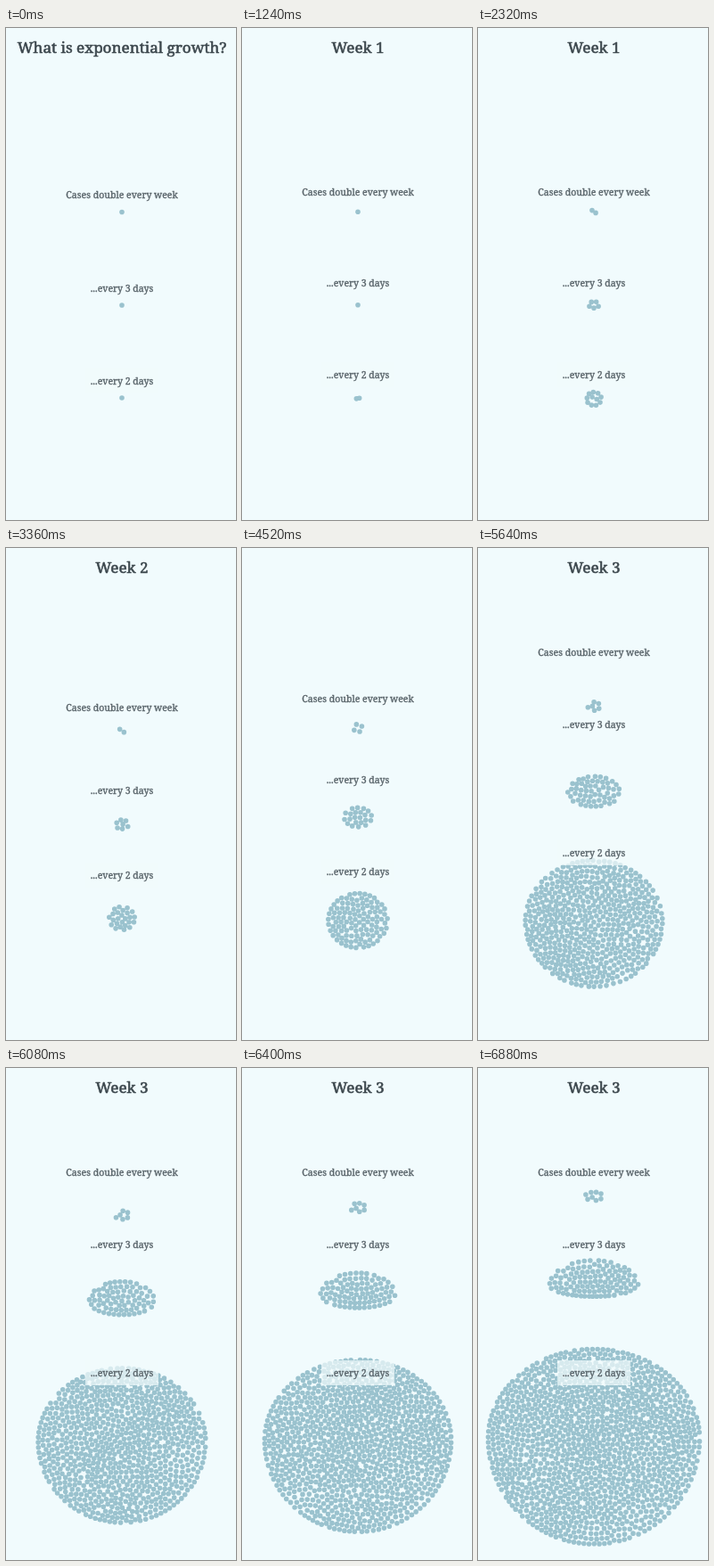
These frames come from a looping animation (258x552 px, 6.92 s). An HTML page with a canvas:

```html
<!DOCTYPE html>
<html lang="en">
<head>
<meta charset="utf-8">
<title>What is exponential growth?</title>
<style>
html, body { margin: 0; width: 100%; height: 100%; overflow: hidden; background: #f1fbfd; }
canvas { display: block; width: 258px; height: 552px; }
</style>
</head>
<body>
<canvas id="stage"></canvas>
<script>
const W = 258, H = 552, LOOP = 6920, STEP = 20;
const MID = 130, DOT = 2.8, GAP = 5.8, AREA = 33;
const BG = '#f1fbfd', DOT_COLOR = '#9ac2ce', TITLE_COLOR = '#3c474d', LABEL_COLOR = '#576268';
const FONT = '"Noto Serif", serif';

const titles = ['What is exponential growth?', 'Week 1', 'Week 2', 'Week 3'];
const weeks = [
  { out: 60, outEnd: 320, in: 430, move: 480, grow: 1150, end: 2350 },
  { out: 2610, outEnd: 2750, in: 2820, move: 2650, grow: 3200, end: 4350 },
  { out: 4310, outEnd: 4450, in: 4525, move: 4350, grow: 4900, end: 6870 }
];
const MOVE_TIME = 500, FADE_IN = 120;

// from/to: factors for half width, height above and height below the centre, at the start and end of week 3
const keyTimes = [0, 2320, 3360, 4520, 5200, 6080, 6880];
const groups = [
  { text: 'Cases double every week', labelY: [187, 184, 179, 117], counts: [1, 2, 4, 8],
    centerY: [206.5, 206, 205, 202, 190, 165, 144], from: [1.2, 1.1, 1.1], to: [1.4, 0.82, 0.82] },
  { text: '...every 3 days', labelY: [292, 286, 272, 198], counts: [1, 5, 22, 112],
    centerY: [311, 310.5, 310, 302, 288, 262, 244], from: [1.2, 0.88, 0.9], to: [1.53, 0.9, 0.44] },
  { text: '...every 2 days', labelY: [396, 389, 367, 342], counts: [1, 11, 112, 1272],
    centerY: [415, 416, 415.5, 418, 419, 419, 415.5], from: [1.05, 0.97, 0.97], to: [1.05, 0.89, 1.05] }
];

const canvas = document.getElementById('stage');
const ctx = canvas.getContext('2d');
const ratio = window.devicePixelRatio || 1;
canvas.width = W * ratio;
canvas.height = H * ratio;
ctx.scale(ratio, ratio);

const clamp = v => Math.max(0, Math.min(1, v));
const lerp = (a, b, k) => a + (b - a) * k;
const part = (t, a, b) => clamp((t - a) / (b - a));
const ease = k => k < 0.5 ? 4 * k ** 3 : 1 - 4 * (1 - k) ** 3;

let seed, simTick;
function random() {
  seed = (seed * 1664525 + 1013904223) >>> 0;
  return seed / 4294967296;
}

function keyed(values, t) {
  let i = 0;
  while (i < keyTimes.length - 2 && t > keyTimes[i + 1]) i++;
  return lerp(values[i], values[i + 1], (t - keyTimes[i]) / (keyTimes[i + 1] - keyTimes[i]));
}

function countAt(g, t) {
  let n = g.counts[0];
  weeks.forEach((w, i) => { n += (g.counts[i + 1] - g.counts[i]) * part(t, w.grow, w.end); });
  return n;
}

function shapeAt(g, t) {
  const radius = Math.sqrt(countAt(g, t) * AREA / Math.PI);
  const k = part(t, weeks[2].grow, weeks[2].end);
  const [rx, up, down] = g.from.map((f, i) => Math.max(0.2, lerp(f, g.to[i], k) * radius - DOT));
  return { rx, up, down };
}

const toPixelY = (v, s) => v * (v < 0 ? s.up : s.down);

// Dots are kept inside a unit disc; a new one takes the emptiest of a few random spots.
function addDot(g, s) {
  let best, bestDist = -1;
  for (let i = 0; i < 10; i++) {
    const a = random() * 2 * Math.PI, r = Math.sqrt(random());
    const u = r * Math.cos(a), v = r * Math.sin(a);
    const x = u * s.rx, y = toPixelY(v, s);
    let dist = Infinity;
    for (const p of g.dots) dist = Math.min(dist, (p.x - x) ** 2 + (p.y - y) ** 2);
    if (dist > bestDist) {
      bestDist = dist;
      best = { u, v, x, y };
    }
  }
  g.dots.push(best);
}

function separate(dots) {
  const cells = new Map();
  const key = (cx, cy) => cx * 1000 + cy;
  for (const p of dots) {
    const cx = Math.floor(p.x / GAP), cy = Math.floor(p.y / GAP);
    for (let i = -1; i <= 1; i++) {
      for (let j = -1; j <= 1; j++) {
        for (const q of cells.get(key(cx + i, cy + j)) || []) {
          const dx = p.x - q.x, dy = p.y - q.y;
          const d = Math.hypot(dx, dy) || 0.01;
          if (d >= GAP) continue;
          const push = (GAP - d) / d * 0.35;
          p.x += dx * push;
          p.y += dy * push;
          q.x -= dx * push;
          q.y -= dy * push;
        }
      }
    }
    const k = key(cx, cy);
    if (!cells.has(k)) cells.set(k, []);
    cells.get(k).push(p);
  }
}

function confine(dots, s) {
  for (const p of dots) {
    p.u = p.x / s.rx;
    p.v = p.y / (p.y < 0 ? s.up : s.down);
    const r = Math.hypot(p.u, p.v);
    if (r > 1) {
      p.u /= r;
      p.v /= r;
    }
    p.x = p.u * s.rx;
    p.y = toPixelY(p.v, s);
  }
}

function tick(t) {
  for (const g of groups) {
    const s = shapeAt(g, t);
    for (const p of g.dots) {
      p.x = p.u * s.rx;
      p.y = toPixelY(p.v, s);
    }
    const n = Math.floor(countAt(g, t) + 0.6);
    while (g.dots.length < n) addDot(g, s);
    for (let i = 0; i < 5; i++) {
      separate(g.dots);
      confine(g.dots, s);
    }
  }
}

function reset() {
  seed = 20;
  simTick = 0;
  for (const g of groups) g.dots = [{ u: 0, v: 0, x: 0, y: 0 }];
}

function advance(t) {
  const goal = Math.floor(t / STEP);
  if (goal < simTick) reset();
  while (simTick < goal) tick(++simTick * STEP);
}

// A thin outline gives the regular face a medium weight.
function drawText(text, y, size, color) {
  ctx.font = `${size}px ${FONT}`;
  ctx.textAlign = 'center';
  ctx.fillStyle = ctx.strokeStyle = color;
  ctx.lineWidth = size * 0.033;
  ctx.lineJoin = 'round';
  ctx.fillText(text, MID, y);
  ctx.strokeText(text, MID, y);
}

function drawTitle(t) {
  let index = 0, alpha = 1;
  weeks.forEach((w, i) => {
    if (t >= w.in) {
      index = i + 1;
      alpha = part(t, w.in, w.in + FADE_IN);
    } else if (t >= w.out) {
      alpha = 1 - part(t, w.out, w.outEnd);
    }
  });
  ctx.globalAlpha = alpha;
  drawText(titles[index], 28, 17.1, TITLE_COLOR);
  ctx.globalAlpha = 1;
}

function drawDots(g, t) {
  const s = shapeAt(g, t), cy = keyed(g.centerY, t);
  ctx.fillStyle = DOT_COLOR;
  ctx.beginPath();
  for (const p of g.dots) {
    const x = MID + p.u * s.rx, y = cy + toPixelY(p.v, s);
    ctx.moveTo(x + DOT, y);
    ctx.arc(x, y, DOT, 0, 2 * Math.PI);
  }
  ctx.fill();
}

function drawLabel(g, t, backed) {
  let y = g.labelY[0];
  weeks.forEach((w, i) => {
    y += (g.labelY[i + 1] - g.labelY[i]) * ease(part(t, w.move, w.move + MOVE_TIME));
  });
  if (backed) {
    ctx.globalAlpha = 0.7;
    ctx.fillStyle = BG;
    ctx.fillRect(89, y - 14, 82, 28);
    ctx.globalAlpha = 1;
  }
  drawText(g.text, y + 4, 10.55, LABEL_COLOR);
}

function draw(t) {
  advance(t);
  ctx.fillStyle = BG;
  ctx.fillRect(0, 0, W, H);
  drawTitle(t);
  groups.forEach(g => drawDots(g, t));
  groups.forEach((g, i) => drawLabel(g, t, i === 2));
}

reset();
const start = performance.now();
function frame() {
  draw((performance.now() - start) % LOOP);
  requestAnimationFrame(frame);
}
frame();
</script>
</body>
</html>
```
